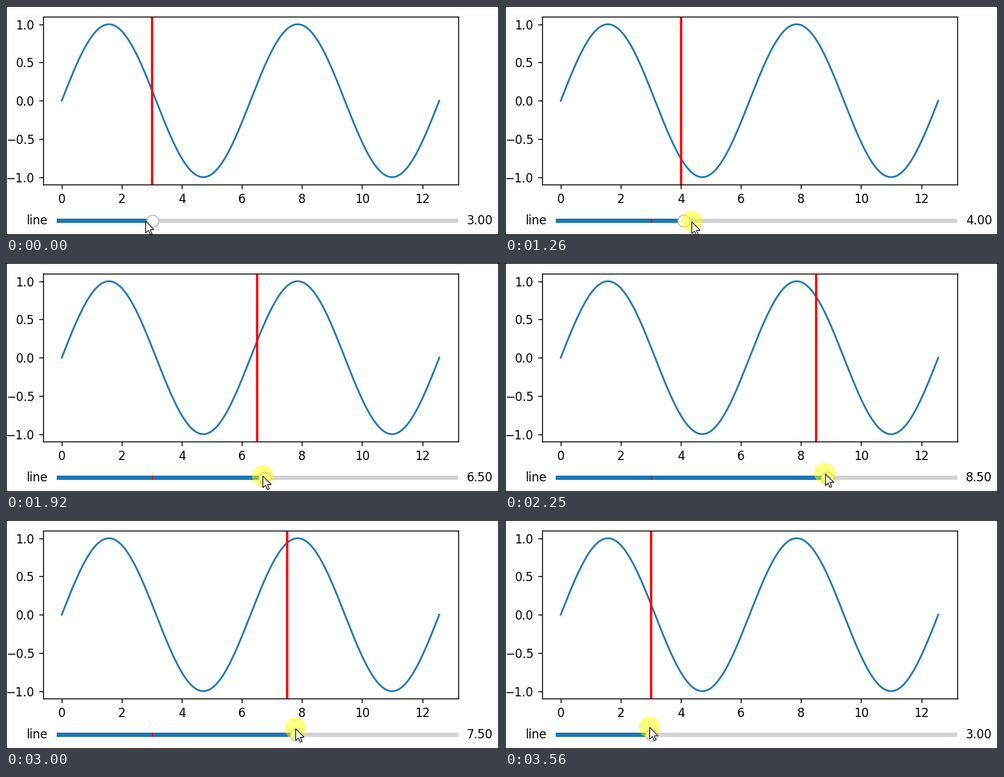
Animation of 690x322 px, one loop 3.61 s. Source, as a matplotlib script:

```python
import numpy as np
import matplotlib.pyplot as plt
from matplotlib.animation import FuncAnimation
from matplotlib.patches import Circle, Polygon, Rectangle

W, H, DPI = 690, 322, 100
PX = 72 / DPI            # points per pixel
LOOP, FRAMES = 3610, 190
STEP = LOOP // FRAMES

VMAX = 4 * np.pi
TRACK_X, TRACK_Y, TRACK_W = 71, 302, 562
SCALE = TRACK_W / VMAX
BLUE = "#1f77b4"
PRESS = 560              # ms at which the mouse button goes down
LAG = 28                 # ms the slider trails the pointer


def linear(u):
    return u


def smooth(u):
    return u * u * (3 - 2 * u)


# pointer moves: start ms, end ms, where to, easing
HOME = np.array([195, 302])
MOVES = [
    (290, 540, (203, 299), smooth),
    (780, 860, (227, 302), linear),
    (860, 1340, (269, 303), linear),
    (1410, 2580, (493, 294), smooth),
    (2740, 3545, (202, 291), linear),
]
ARROW = np.array([(0, 0), (0, 16.5), (3.8, 13), (6.4, 19),
                  (8.9, 18), (6.4, 12), (11.7, 12)])


def pointer(t):
    pos = HOME
    for start, end, goal, ease in MOVES:
        u = np.clip((t - start) / (end - start), 0, 1)
        pos = pos + (np.array(goal) - pos) * ease(u)
    return pos


def slider_value(t):
    """Slider value under the pointer, snapped to steps of 0.5."""
    return round((pointer(t - LAG)[0] - TRACK_X) / SCALE * 2) / 2


plt.rcParams.update({"font.family": "DejaVu Sans", "font.size": 12})
fig = plt.figure(figsize=(W / DPI, H / DPI), dpi=DPI, facecolor="white")

# sine plot
left, right, top, bottom = 51.6, 632.8, 14.9, 251.4
ax = fig.add_axes([left / W, 1 - bottom / H, (right - left) / W, (bottom - top) / H])
xs = np.linspace(0, VMAX, 500)
ax.plot(xs, np.sin(xs), color=BLUE, lw=1.8)
ax.set_xlim(-0.05 * VMAX, 1.05 * VMAX)
ax.set_ylim(-1.1, 1.1)
ax.set_xticks(range(0, 13, 2))
ax.set_yticks(np.linspace(-1, 1, 5))
ax.tick_params(length=4.2, width=0.96, pad=4.2)
for spine in ax.spines.values():
    spine.set_linewidth(0.96)
marker = ax.axvline(3, color="red", lw=2.4)

# slider and pointer, in pixels from the top left
stage = fig.add_axes([0, 0, 1, 1])
stage.set_xlim(0, W)
stage.set_ylim(H, 0)
stage.axis("off")


def bar(color, z):
    return stage.add_patch(Rectangle((TRACK_X, TRACK_Y - 3), TRACK_W, 6,
                                     fc=color, ec="none", zorder=z))


track = bar("lightgrey", 1)
fill = bar(BLUE, 2)
start_x = TRACK_X + 3 * SCALE
start_mark, = stage.plot([start_x] * 2, [TRACK_Y - 10, TRACK_Y + 10],
                         color="red", lw=1.2, zorder=3)
start_mark.set_clip_path(track)
handle, = stage.plot([start_x], [TRACK_Y], "o", ms=12, mfc="white",
                     mec="0.75", mew=1.2, zorder=4)
stage.text(58.8, TRACK_Y, "line", ha="right", va="center")
readout = stage.text(645, TRACK_Y, "3.00", ha="left", va="center")

glow = stage.add_patch(Circle(HOME, 15, fc="#ffff00", ec="none",
                              alpha=0.5, zorder=5))
cursor = stage.add_patch(Polygon(ARROW, closed=True, fc="white", ec="black",
                                 lw=PX, joinstyle="miter", zorder=6))

# one-pixel border, as four filled strips
for x, y, w, h in [(0, 0, W, 1), (0, H - 1, W, 1), (0, 0, 1, H), (W - 1, 0, 1, H)]:
    stage.add_patch(Rectangle((x, y), w, h, fc="black", ec="none", zorder=7))


def update(k):
    t = k * STEP
    pos = pointer(t)
    value = slider_value(t)
    x = TRACK_X + value * SCALE
    marker.set_xdata([value, value])
    fill.set_width(x - TRACK_X)
    handle.set_xdata([x])
    readout.set_text(f"{value:.2f}")
    glow.center = tuple(pos)
    glow.set_visible(t >= PRESS)
    cursor.set_xy(np.round(pos) + 0.5 + ARROW)
    return marker, fill, handle, readout, glow, cursor


anim = FuncAnimation(fig, update, frames=FRAMES, interval=STEP,
                     repeat=True, repeat_delay=0, blit=False)
plt.show()
```
